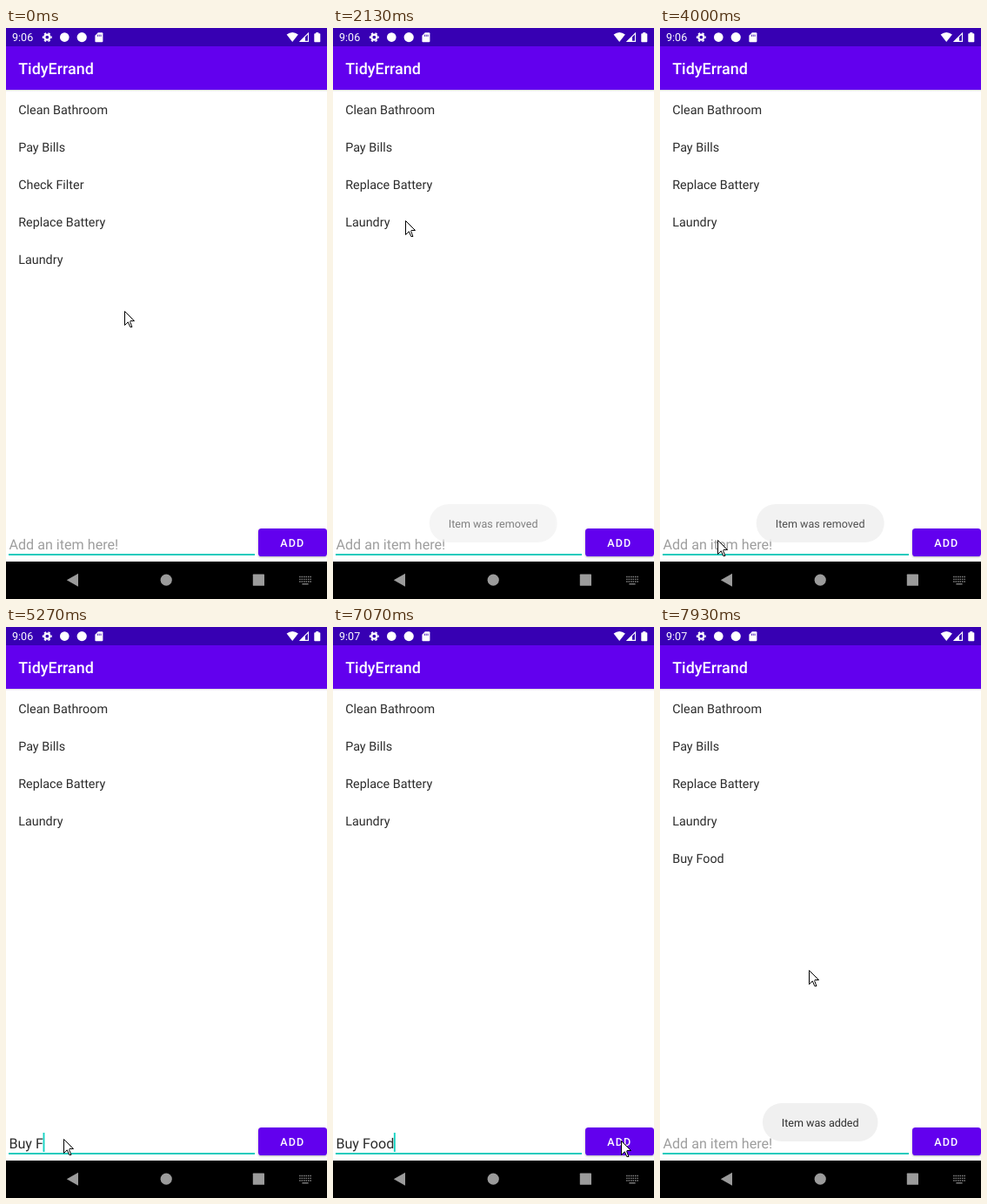
These frames come from a looping animation (369 by 656 pixels, 8 s). An HTML page:

```html
<!DOCTYPE html>
<html lang="en">
<head>
<meta charset="utf-8">
<title>Todo list</title>
<style>
  html, body { margin: 0; width: 100%; height: 100%; overflow: hidden; background: #fff; }
  svg { display: block; width: 369px; height: 656px; }
  text { font-family: Roboto, sans-serif; white-space: pre; text-rendering: geometricPrecision; }
  .item { font-size: 14.36px; fill: #2c2c2c; }
  .field { font-size: 16.15px; }
  .small { font-size: 12.56px; }
</style>
</head>
<body>
<svg viewBox="0 0 369 656" xmlns="http://www.w3.org/2000/svg">
  <defs>
    <linearGradient id="shade" x1="0" y1="0" x2="0" y2="1">
      <stop offset="0" stop-color="#000" stop-opacity=".15"/>
      <stop offset="1" stop-color="#000" stop-opacity="0"/>
    </linearGradient>
    <filter id="lift" x="-10%" y="-20%" width="120%" height="150%">
      <feDropShadow dx="0" dy="1" stdDeviation=".9" flood-opacity=".28"/>
    </filter>
    <clipPath id="buttonShape"><rect x="290" y="575" width="79" height="32" rx="3.6"/></clipPath>
  </defs>

  <rect width="369" height="656" fill="#fff"/>

  <!-- app bar -->
  <rect y="71" width="369" height="2" fill="url(#shade)"/>
  <rect y="21" width="369" height="50" fill="#6200ee"/>
  <text x="14.2" y="53" font-size="17.95" font-weight="500" fill="#fff">TidyErrand</text>

  <!-- status bar -->
  <rect width="369" height="21" fill="#3700b3"/>
  <g fill="#fff">
    <text id="clock" class="small" x="7" y="15.3"></text>
    <g fill="none" stroke="#fff">
      <circle cx="47.3" cy="10.6" r="3" stroke-width="2.2"/>
      <circle cx="47.3" cy="10.6" r="4.7" stroke-width="1.6" pathLength="12" stroke-dasharray="1 1" stroke-dashoffset=".5"/>
    </g>
    <circle cx="67.3" cy="10.6" r="5.3"/>
    <circle cx="87.2" cy="10.6" r="5.6"/>
    <path d="M105.8 5.2h4.6q1 0 1 1v9q0 1-1 1h-7q-1 0-1-1V8.8z"/>
    <path d="M105.3 7.6v2.2M107.2 7.6v2.2M109.1 7.6v2.2" stroke="#3700b3" stroke-width=".9"/>
    <path d="M322.6 7.6Q329.2 2.4 335.9 7.6L329.2 16z"/>
    <path d="M347.5 6v9.4h-9.4z" fill="none" stroke="#fff" stroke-width="1.1"/>
    <path d="M344 9.5v6h-6z"/>
    <path d="M356.3 5h3v1.2h1.2q.8 0 .8.8v8.4q0 .8-.8.8h-5.4q-.8 0-.8-.8V7q0-.8.8-.8h1.2z"/>
  </g>

  <g id="list"></g>

  <!-- input row -->
  <text id="hint" class="field" x="3.4" y="599" fill="#9e9e9e">Add an item here!</text>
  <text id="entry" class="field" x="3.4" y="599" fill="#2c2c2c"></text>
  <rect x="3" y="604" width="283" height="2" fill="#1ecbbd"/>
  <rect id="caret" y="581" width="1.9" height="22" fill="#16d3c3"/>
  <rect x="290" y="575" width="79" height="32" rx="3.6" fill="#6200ee" filter="url(#lift)"/>
  <circle id="ripple" cx="333" cy="590" fill="#fff" clip-path="url(#buttonShape)"/>
  <text x="315.2" y="596" class="small" font-weight="500" letter-spacing="1.12" fill="#fff">ADD</text>

  <!-- navigation bar -->
  <rect y="613" width="369" height="43" fill="#000"/>
  <g fill="#9b9b9b">
    <path d="M69.8 634.2L83 626.7v15z"/>
    <circle cx="184.2" cy="634.2" r="6.6"/>
    <rect x="283.8" y="627.6" width="13.2" height="13.2" rx=".6"/>
    <g fill="none" stroke="#8c8c8c" stroke-width="1.3">
      <path d="M337.2 630.5h13.6M337.2 633.3h13.6M337.2 636h13.6" stroke-dasharray="1.4 1.04"/>
      <path d="M340.4 638.8h7.2"/>
    </g>
  </g>

  <g id="toast">
    <rect id="pill" y="547" height="44" rx="22" fill="#f0f0f0"/>
    <text id="message" class="small" x="184.2" y="574.2" text-anchor="middle" fill="#2f2f2f"></text>
  </g>

  <path id="cursor" d="M.5 .5V16.5L4.3 12.8L6.8 18.5H8.9L6.7 12.5L7 11.5H11.5z" fill="#fff" stroke="#000"/>
</svg>

<script>
const LOOP = 8000, STEP = 1000 / 15;
const $ = id => document.getElementById(id);
const clamp = v => Math.max(0, Math.min(1, v));
const span = (t, a, b) => clamp((t - a) / (b - a));
const smooth = p => p * p * (3 - 2 * p);

// time, x, y of the pointer tip
const PATH = [
  [0, 136, 325], [535, 136, 325], [1000, 86, 174], [1135, 86, 174],
  [1200, 80, 178], [2000, 80, 178], [2730, 116, 636], [2800, 116, 636],
  [2870, 103, 628], [3400, 66, 588], [6400, 66, 588], [6600, 150, 567],
  [6900, 340, 611], [7070, 331, 590], [7500, 331, 590], [7930, 171, 394]
];
const BLINKS = [270, 800, 1270, 1730, 2200, 2730, 3200, 3730, 4200, 6130, 6670, 7130, 7400, 7870];
const WORD = "Buy Food";
const KEYS = [4530, 4730, 4800, 4930, 5270, 5400, 5530, 5670];
const REMOVED = 1930, ADDED = 7400, MINUTE = 5400;
const TOASTS = [
  { text: "Item was removed", width: 147, from: 1960, out: 3870 },
  { text: "Item was added", width: 132.5, from: 7430, out: Infinity }
];

const passed = (times, t) => times.filter(at => at <= t).length;

const rows = Array.from({ length: 5 }, (_, i) => {
  const row = document.createElementNS("http://www.w3.org/2000/svg", "text");
  row.setAttribute("class", "item");
  row.setAttribute("x", 14.2);
  row.setAttribute("y", 99 + i * 43);
  return $("list").appendChild(row);
});

function setText(node, text) {
  if (node.textContent !== text) node.textContent = text;
}

function pointer(t) {
  const i = PATH.findIndex(k => k[0] > t);
  if (i < 0) return PATH[PATH.length - 1].slice(1);
  const [t0, x0, y0] = PATH[i - 1], [t1, x1, y1] = PATH[i];
  const p = smooth(span(t, t0, t1));
  return [x0 + (x1 - x0) * p, y0 + (y1 - y0) * p];
}

function drawList(t) {
  const items = ["Clean Bathroom", "Pay Bills"];
  if (t < REMOVED) items.push("Check Filter");
  items.push("Replace Battery", "Laundry");
  if (t >= ADDED) items.push(WORD);
  rows.forEach((row, i) => setText(row, items[i] || ""));
}

function drawField(t) {
  const typed = t < ADDED ? WORD.slice(0, passed(KEYS, t)) : "";
  setText($("entry"), typed);
  $("hint").style.display = typed ? "none" : "";
  $("caret").style.display = passed(BLINKS, t) % 2 ? "" : "none";
  const width = typed ? $("entry").getComputedTextLength() : 0;
  $("caret").setAttribute("x", 3 + width);
}

function drawToast(t) {
  const toast = TOASTS[t < TOASTS[1].from ? 0 : 1];
  const rise = 1 - (1 - span(t, toast.from, toast.from + 470)) ** 2;
  const fall = toast.out < LOOP ? span(t, toast.out, 4340) ** 1.5 : 0;
  $("toast").setAttribute("opacity", rise * (1 - fall));
  setText($("message"), toast.text);
  $("pill").setAttribute("width", toast.width);
  $("pill").setAttribute("x", 184.2 - toast.width / 2);
}

function draw(time) {
  const t = Math.floor(time / STEP + 0.1) * STEP + 4;
  drawList(t);
  drawField(t);
  drawToast(t);
  setText($("clock"), t < MINUTE ? "9:06" : "9:07");
  $("ripple").setAttribute("r", 12 + 46 * span(t, 7330, 7530));
  $("ripple").setAttribute("opacity", t < 7330 ? 0 : 0.22 * (1 - span(t, 7470, 7730)));
  const [x, y] = pointer(t).map(Math.round);
  $("cursor").setAttribute("transform", `translate(${x} ${y})`);
}

const start = performance.now();
function tick() {
  draw((performance.now() - start) % LOOP);
  requestAnimationFrame(tick);
}
tick();
</script>
</body>
</html>
```
